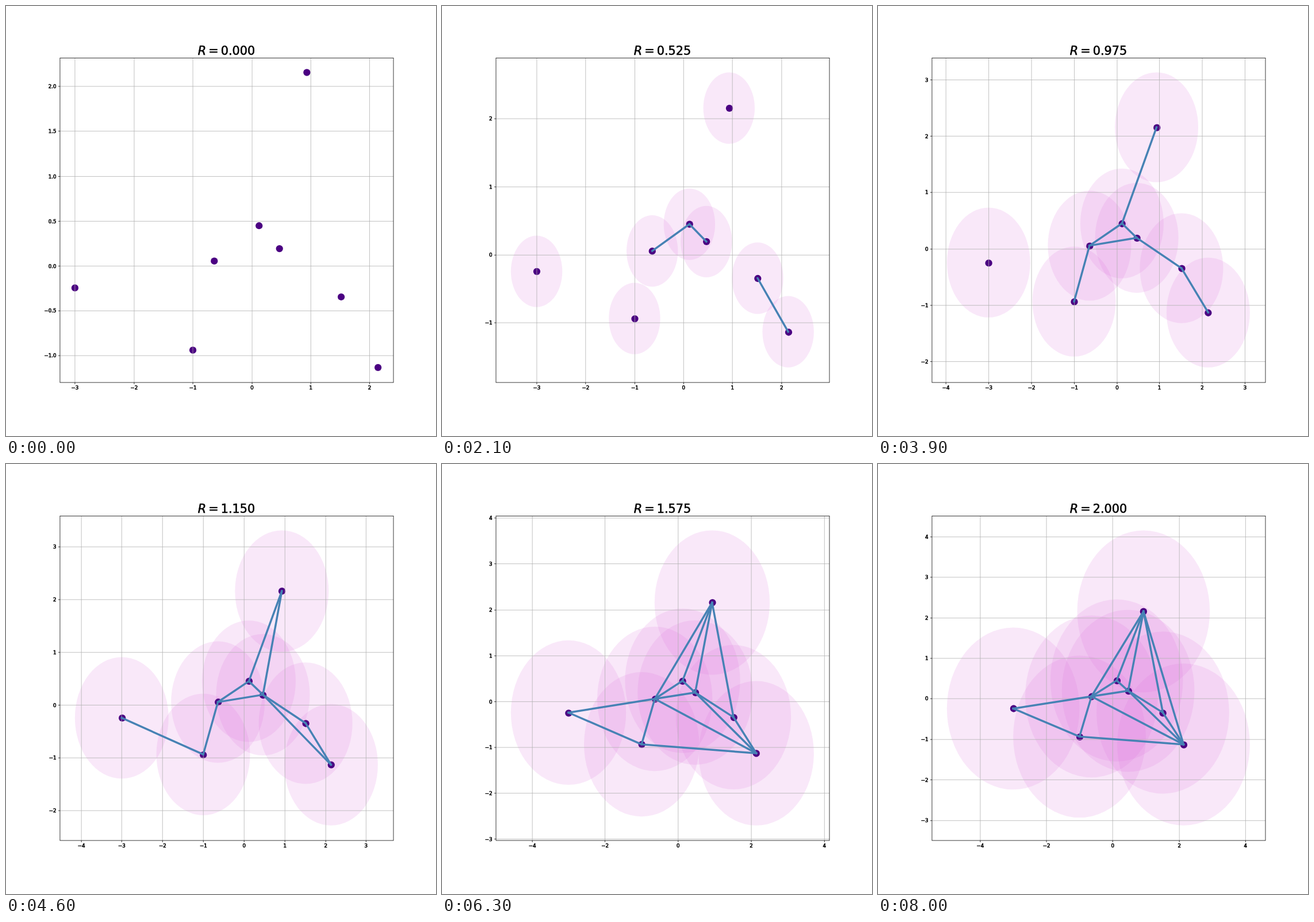
Animation of 748x748 px, one loop 8.1 s. Source, as an HTML page:

```html
<!DOCTYPE html>
<html lang="en">
<head>
<meta charset="utf-8">
<title>Growing discs</title>
<style>
  html, body { margin: 0; width: 100%; height: 100%; overflow: hidden; background: #fff; }
  svg { display: block; width: 100vw; height: 100vh; }
  text { font-family: "DejaVu Sans", Verdana, sans-serif; fill: #000; stroke: #000; stroke-width: .65px; }
  .tick { font-size: 10px; }
  .title { font-size: 24px; text-anchor: middle; }
  .r { font-style: italic; }
  .grid { stroke: #b0b0b0; stroke-width: .9; }
  .axis { stroke: #000; stroke-width: .9; fill: none; }
  .disc { fill: orchid; fill-opacity: .16; }
  .dot { fill: indigo; }
  .edge { stroke: steelblue; stroke-width: 4; stroke-linecap: square; }
</style>
</head>
<body>
<svg id="plot" viewBox="0 0 864 864"></svg>
<script>
const STEP_MS = 100, STEPS = 81, R_STEP = 0.025;
const BOX = { left: 108, right: 777.6, top: 103.68, bottom: 756 };

const points = {
  A: [0.933, 2.154], B: [0.124, 0.448], C: [0.470, 0.192], D: [-0.636, 0.054],
  E: [-2.998, -0.246], F: [-0.997, -0.938], G: [1.517, -0.346], H: [2.141, -1.133]
};
// Triangulation edges; each shows once its two discs touch.
const edges = "BC BD GH DF CD CG AB AC EF CH ED AG AD DH FH AH".split(" ")
  .map(([a, b]) => [points[a], points[b]]);
const list = Object.values(points);

const plot = document.getElementById("plot");
const snap = v => Math.round(v) + 0.5;
const line = (cls, x1, y1, x2, y2) =>
  `<line class="${cls}" x1="${x1}" y1="${y1}" x2="${x2}" y2="${y2}"/>`;
const ellipse = (cls, x, y, rx, ry) =>
  `<ellipse class="${cls}" cx="${x}" cy="${y}" rx="${rx}" ry="${ry}"/>`;
const label = (x, y, anchor, value) =>
  `<text class="tick" x="${x}" y="${y}" text-anchor="${anchor}">${value}</text>`;

// The axes sit on the same pixel grid as the tick lines.
const left = snap(BOX.left), right = snap(BOX.right);
const top_ = snap(BOX.top), bottom = snap(BOX.bottom);

// Data limits for one dimension, with a 5 % margin on both sides.
function limits(dim, r) {
  const values = list.map(p => p[dim]);
  const lo = Math.min(...values) - r, hi = Math.max(...values) + r;
  const pad = (hi - lo) * 0.05;
  return [lo - pad, hi + pad];
}

function ticks([lo, hi]) {
  const step = [0.5, 1, 2].find(s => s >= (hi - lo) / 9);
  const out = [];
  for (let v = Math.ceil(lo / step) * step; v <= hi; v += step) {
    const text = Math.abs(v).toFixed(step < 1 ? 1 : 0);
    out.push([v, (v < 0 ? "\u2212" : "") + text]);
  }
  return out;
}

function draw(step) {
  const r = step * R_STEP;
  const xl = limits(0, r), yl = limits(1, r);
  const sx = (BOX.right - BOX.left) / (xl[1] - xl[0]);
  const sy = (BOX.bottom - BOX.top) / (yl[1] - yl[0]);
  const X = v => BOX.left + (v - xl[0]) * sx;
  const Y = v => BOX.bottom - (v - yl[0]) * sy;

  let discs = "", dots = "", grid = "", links = "", axes = "";
  for (const [x, y] of list) {
    discs += ellipse("disc", X(x), Y(y), r * sx, r * sy);
    dots += ellipse("dot", snap(X(x)), snap(Y(y)), 7.1, 7.1);
  }
  for (const [v, text] of ticks(xl)) {
    const x = snap(X(v));
    grid += line("grid", x, top_, x, bottom);
    axes += line("axis", x, bottom, x, bottom + 3.5) + label(x, 771, "middle", text);
  }
  for (const [v, text] of ticks(yl)) {
    const y = snap(Y(v));
    grid += line("grid", left, y, right, y);
    axes += line("axis", left - 3.5, y, left, y) + label(101, y + 3.7, "end", text);
  }
  for (const [p, q] of edges) {
    if (Math.hypot(p[0] - q[0], p[1] - q[1]) <= 2 * r)
      links += line("edge", X(p[0]), Y(p[1]), X(q[0]), Y(q[1]));
  }
  const frame = `<rect class="axis" x="${left}" y="${top_}" ` +
    `width="${right - left}" height="${bottom - top_}"/>`;
  const title = `<text class="title" x="443" y="98"><tspan class="r">R</tspan>` +
    `<tspan dx=".195em">=</tspan><tspan dx=".195em">${r.toFixed(3)}</tspan></text>`;
  plot.innerHTML = discs + dots + grid + links + frame + axes + title;
}

const start = performance.now();
let shown = -1;
function tick() {
  const step = Math.floor((performance.now() - start) / STEP_MS) % STEPS;
  if (step !== shown) draw(shown = step);
  requestAnimationFrame(tick);
}
tick();
</script>
</body>
</html>
```
